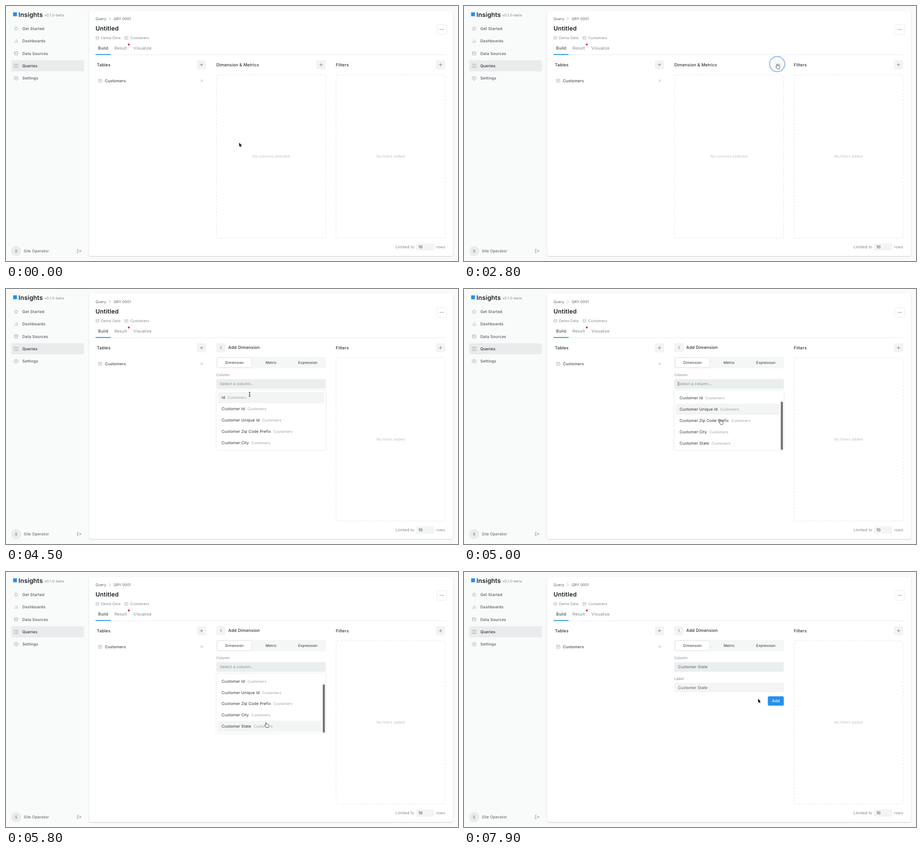
Recreate the animation shown at these times as an HTML page. Size 996 by 562 pixels, loop 8000 ms.

```html
<!DOCTYPE html>
<html lang="en">
<head>
<meta charset="utf-8">
<title>Query builder</title>
<style>
  html, body { margin: 0; width: 100%; height: 100%; overflow: hidden; background: #f9fafa; }
  svg { display: block; width: 100%; height: 100%; }
  text { font-family: Inter, "Liberation Sans", sans-serif; letter-spacing: .02em; text-rendering: geometricPrecision; white-space: pre; }
  text[font-weight="600"] { letter-spacing: .01em; }
  .card { filter: drop-shadow(0 1.2px 1.3px rgba(20, 30, 40, .2)); }
  .pop { filter: drop-shadow(0 .6px 1.1px rgba(20, 30, 40, .22)); }
  .icon { fill: none; stroke-linecap: round; stroke-linejoin: round; }
</style>
</head>
<body>
<svg id="stage" viewBox="0 0 996 562"></svg>
<script>
const LOOP = 8000, STEP = 100;
const ROW_H = 24.85, MAX_SCROLL = 23.6;
const INK = '#2b3034', MID = '#555b5f', SOFT = '#80868a', PALE = '#bcc1c4', FILL = '#f2f4f4';
const BLUE = '#2490ef';
const SMALL = 7.92, BASE = 8.58, TAB = 9.1, LARGE = 9.24, TITLE = 13.2;

// y is the middle of the capital letters
const text = (x, y, s, size = BASE, color = INK, weight = 400, anchor = 'start') =>
  `<text x="${x}" y="${(y + size * .364).toFixed(2)}" font-size="${size}" fill="${color}" font-weight="${weight}" text-anchor="${anchor}">${s}</text>`;
const rect = (x, y, w, h, fill, r = 3, extra = '') =>
  `<rect x="${x}" y="${y}" width="${w}" height="${h}" rx="${r}" fill="${fill}" ${extra}/>`;
const line = (d, color, width = .8) => `<path d="${d}" stroke="${color}" stroke-width="${width}" class="icon"/>`;

const ICONS = {
  star: 'M12 2l3.1 6.3 6.9 1-5 4.9 1.2 6.8-6.2-3.2L5.8 21 7 14.2 2 9.3l6.9-1z',
  bars: 'M19 21V9M12 21V3M5 21v-7',
  data: 'M3 5c0-4 18-4 18 0s-18 4-18 0v14c0 4 18 4 18 0V5M3 12c0 4 18 4 18 0',
  columns: 'M3 3h18v18H3zM12 3v18',
  gear: 'M9 12a3 3 0 1 0 6 0a3 3 0 1 0-6 0M9.5 2h5l1 3 3 1.5 3-.5 2 4-2 2 2 2.5-2 4-3.5-.5-2.5 1.5-1 3h-5l-1-3L6 18l-3 .5-2-4L3 12 1 9.5l2-4 3 .5L8.5 5z',
  table: 'M3 3h18v18H3zM3 9h18M10 9v12',
  exit: 'M9 3H3v18h6M9 12h13M17 7l5 5-5 5'
};
const icon = (name, x, y, size = 10, color = '#8e9498') =>
  `<g transform="translate(${x - size / 2} ${y - size / 2}) scale(${size / 24})">${line(ICONS[name], color, 1.6)}</g>`;

const plusButton = x => rect(x - 10.2, 119.4, 20.4, 20.2, FILL) +
  line(`M${x - 3.2} 129.5h6.4M${x} 126.3v6.4`, '#5d6367', .75);
const emptyBox = (x, label) =>
  rect(x, 151.7, 240.4, 359.6, 'none', 4, 'stroke="#e5e8e9" stroke-width="1.2" stroke-dasharray="4 3.2"') +
  text(x + 120.2, 331.5, label, SMALL, PALE, 400, 'middle');

function sidebar() {
  const items = [['star', 'Get Started'], ['bars', 'Dashboards'], ['data', 'Data Sources'], ['columns', 'Queries'], ['gear', 'Settings']];
  return rect(15.7, 14, 8.3, 8.6, BLUE, 0) +
    text(27.6, 18.8, 'Insights', 13.7, '#1b2024', 600) +
    text(84.5, 20.3, 'v0.1.0-beta', SMALL, SOFT) +
    rect(11.5, 119.6, 160.2, 24.4, '#e9eced', 3) +
    items.map(([name, label], i) => {
      const y = 49.9 + i * 27.35;
      return icon(name, 22.3, y) + text(36, y, label, BASE, i === 3 ? INK : MID, 500);
    }).join('') +
    '<circle cx="22.3" cy="540.2" r="10.9" fill="#e9ecec"/>' +
    text(22.4, 540.3, 'S', SMALL, MID, 400, 'middle') +
    text(39, 540.2, 'Site Operator', BASE, MID) + icon('exit', 161, 540, 10, '#5d6367');
}

function page() {
  return rect(183, 11, 802, 540, '#fff', 4, 'class="card"') +
    text(197.2, 28, 'Query', SMALL, MID) + line('M227.6 25.3l2.7 2.7-2.7 2.7', SOFT) +
    text(237.2, 28, 'QRY 0001', SMALL, MID) +
    text(197.2, 49.6, 'Untitled', TITLE, '#1b2024', 600) +
    icon('data', 201.4, 70.3, 8.5) + text(209.5, 70.3, 'Demo Data', SMALL, SOFT) +
    icon('table', 265.4, 70.3, 8.5) + text(273.7, 70.3, 'Customers', SMALL, SOFT) +
    rect(950, 41.5, 20.3, 20.3, '#fff', 3, 'class="pop"') +
    [956.8, 960.2, 963.6].map(x => `<circle cx="${x}" cy="51.6" r=".8" fill="#444a4e"/>`).join('') +
    text(203, 92.6, 'Build', TAB, INK) + text(239, 92.6, 'Result', TAB, SOFT) +
    text(280.8, 92.6, 'Visualize', TAB, SOFT) +
    '<circle cx="270.6" cy="84.8" r="2.1" fill="#d3262f"/>' +
    line('M197.5 107.6H970', '#e5e8e9', .9) + rect(197.3, 105.9, 33.2, 1.9, '#2495e6', 0) +
    text(200.2, 129.5, 'Tables', LARGE, INK, 500) + plusButton(430.8) +
    icon('table', 207.8, 164.7, 9) + text(218, 164.6, 'Customers', BASE, '#42484c', 500) +
    line('M429.4 162.7l4 4m0-4l-4 4', SOFT, .7) +
    text(726.8, 129.5, 'Filters', LARGE, INK, 500) + plusButton(957.5) + emptyBox(727.2, 'No filters added') +
    text(858.2, 531.3, 'Limited to', BASE, SOFT) + rect(904, 523, 40, 16.3, '#f3f5f5') +
    text(908.8, 531.3, '10', BASE, INK) + text(947.7, 531.3, 'rows', BASE, SOFT);
}

const emptyPanel = () => text(463.4, 129.5, 'Dimension &amp; Metrics', LARGE, INK, 500) +
  plusButton(694.2) + emptyBox(463.9, 'No columns selected');

const formPanel = () => rect(463.5, 119, 20.3, 20.3, FILL) + line('M475 126.2l-2.8 2.8 2.8 2.8', '#444a4e', .9) +
  text(489.8, 129, 'Add Dimension', LARGE, INK, 500) +
  rect(463.4, 150, 241.4, 24.3, '#f5f7f7', 4, 'stroke="#eef0f1" stroke-width=".6"') +
  rect(466, 152, 75.2, 20.2, '#fff', 3, 'class="pop"') +
  ['Dimension', 'Metric', 'Expression'].map((s, i) => text(503.5 + i * 80.8, 162, s, SMALL, INK, 400, 'middle')).join('') +
  text(463.3, 189, 'Column', SMALL, SOFT) +
  '<rect id="field" x="463.4" y="198.4" width="241.4" height="21.6" rx="3"/>' +
  `<g id="hint">${text(471.6, 209.2, 'Select a column...', BASE, '#858c90')}</g>` +
  rect(471.5, 204, .8, 10.4, '#555', 0, 'id="caret"');

function dropdown() {
  const names = ['Id', 'Customer Id', 'Customer Unique Id', 'Customer Zip Code Prefix', 'Customer City', 'Customer State'];
  const rows = names.map((name, i) => text(475, 239.3 + i * ROW_H,
    `${name}<tspan dx="5.6" font-size="${SMALL}" fill="#9a9fa3">Customers</tspan>`)).join('');
  return rect(463.6, 223.5, 241, 131.8, '#fff', 3.5, 'class="pop"') +
    `<g clip-path="url(#listClip)"><g id="list">${rect(467, 0, 234, 24.6, '#f3f4f4', 2.5, 'id="hover"')}${rows}</g></g>` +
    `<g id="bar">${rect(696, 224.5, 8, 130, '#fff', 0)}${rect(698, 224.4, 4.7, 105.8, '#747474', .8, 'id="thumb"')}</g>`;
}

const result = () => text(471.6, 209.2, 'Customer State', BASE, MID) +
  text(463.3, 235, 'Label', SMALL, SOFT) + rect(463.4, 244.2, 241.4, 21, '#f3f5f5') +
  text(471.6, 254.7, 'Customer State', BASE, MID) +
  rect(669.5, 274, 35.2, 20.5, BLUE) + text(687.1, 284.3, 'Add', BASE, '#fff', 500, 'middle');

// Each pointer has its hot spot at 0,0
const pointers = () =>
  '<path id="arrow" d="M0 .3V9L2 7.2 3.3 10 4.7 9.4 3.5 6.600H6.100Z" fill="#111" stroke="#fff" stroke-width=".8" paint-order="stroke"/>' +
  `<g id="beam">${line('M-1.7-4.7Q0-4.7 0-3.7Q0-4.7 1.7-4.7M0-3.7V3.7M-1.7 4.7Q0 4.7 0 3.7Q0 4.7 1.7 4.7M-1 .8H1', '#222', .9)}</g>` +
  '<path id="hand" d="M-1 .5Q0-.7 1 .5V3.6Q2 2.9 2.9 3.9Q3.9 3.3 4.6 4.3Q5.9 4 6 5.3V7.3Q5.8 8.7 5 9.7V10.7H.2V9.8L-3 6.3Q-3.3 4.9-2 5.2L-1 6.2Z" fill="#fff" stroke="#222" stroke-width=".8" stroke-linejoin="round"/>';

const stage = document.getElementById('stage');
stage.innerHTML = '<defs><clipPath id="listClip"><rect x="464" y="224" width="240" height="131"/></clipPath></defs>' +
  sidebar() + page() +
  `<g id="empty">${emptyPanel()}</g><g id="form">${formPanel()}</g>` +
  `<g id="drop">${dropdown()}</g><g id="done">${result()}</g>` +
  '<circle id="ring" fill="#fff" fill-opacity=".3" stroke="#8cb2e9" stroke-width="2"/>' +
  `<g id="pointer">${pointers()}</g>`;

const $ = id => document.getElementById(id);
const show = (id, on) => $(id).setAttribute('display', on ? 'inline' : 'none');
const set = (id, attrs) => { for (const k in attrs) $(id).setAttribute(k, attrs[k]); };

// time, x, y
const PATH = [
  [1000, 513.8, 301], [1400, 592.8, 239], [2000, 592.8, 239], [2600, 690, 128], [2900, 690, 128],
  [3400, 527, 212.5], [4400, 527, 212.5], [4700, 565, 288], [5000, 565, 288],
  [5700, 573, 332], [5800, 573, 332], [6100, 573, 335], [7500, 573, 335], [7900, 648, 279]
];
const SHAPES = [[0, 'arrow'], [2500, 'hand'], [3000, 'arrow'], [3400, 'beam'], [4600, 'hand'], [7200, 'arrow']];
const SCROLL = [[4800, 0], [4900, 15], [5000, 24], [5100, MAX_SCROLL]];
const BAR = [[4000, 1], [4200, 0], [4800, 0], [4900, 1], [6500, 1], [6800, 0]];
const CLICKS = [1800, 2700, 3600, 7100];

const smooth = p => p * p * (3 - 2 * p);
function sample(keys, t, ease = p => p) {
  if (t <= keys[0][0]) return keys[0].slice(1);
  const i = keys.findIndex(k => k[0] > t);
  if (i < 0) return keys[keys.length - 1].slice(1);
  const a = keys[i - 1], b = keys[i], p = ease((t - a[0]) / (b[0] - a[0]));
  return a.slice(1).map((v, n) => v + (b[n + 1] - v) * p);
}

function draw(t) {
  const [x, y] = sample(PATH, t, smooth);
  const [scroll] = sample(SCROLL, t);
  const [bar] = sample(BAR, t);
  const open = t >= 3600 && t < 7200;

  show('empty', t < 2900);
  show('form', t >= 2900);
  show('drop', open);
  show('done', t >= 7200);
  show('hint', t < 7200);
  show('caret', open && Math.floor((t - 3580) / 560) % 2 === 0);
  set('field', { fill: t >= 3600 ? '#ebeeef' : '#f3f5f5' });

  // The highlight catches up only once scrolling ends
  const row = Math.floor((y + (t > 5000 ? scroll : 0) - 227) / ROW_H);
  show('hover', row >= 0);
  set('hover', { y: 227 + row * ROW_H, width: bar > 0 ? 229 : 234 });
  set('list', { transform: `translate(0 ${-scroll})` });
  set('thumb', { y: 224.4 + scroll });
  set('bar', { opacity: bar });

  const click = CLICKS.find(c => t >= c && t < c + 400);
  show('ring', click !== undefined);
  if (click !== undefined) {
    const age = t - click;
    set('ring', { cx: x, cy: y, r: 15.5 + age / 80, opacity: Math.min(1, 1.3 - age / 350) });
  }

  const shape = SHAPES.filter(s => s[0] <= t).pop()[1];
  ['arrow', 'beam', 'hand'].forEach(s => show(s, s === shape));
  set('pointer', { transform: `translate(${x} ${y})` });
}

const start = performance.now();
function tick() {
  const t = (performance.now() - start) % LOOP;
  draw(Math.floor(t / STEP) * STEP);
  requestAnimationFrame(tick);
}
tick();
</script>
</body>
</html>
```
